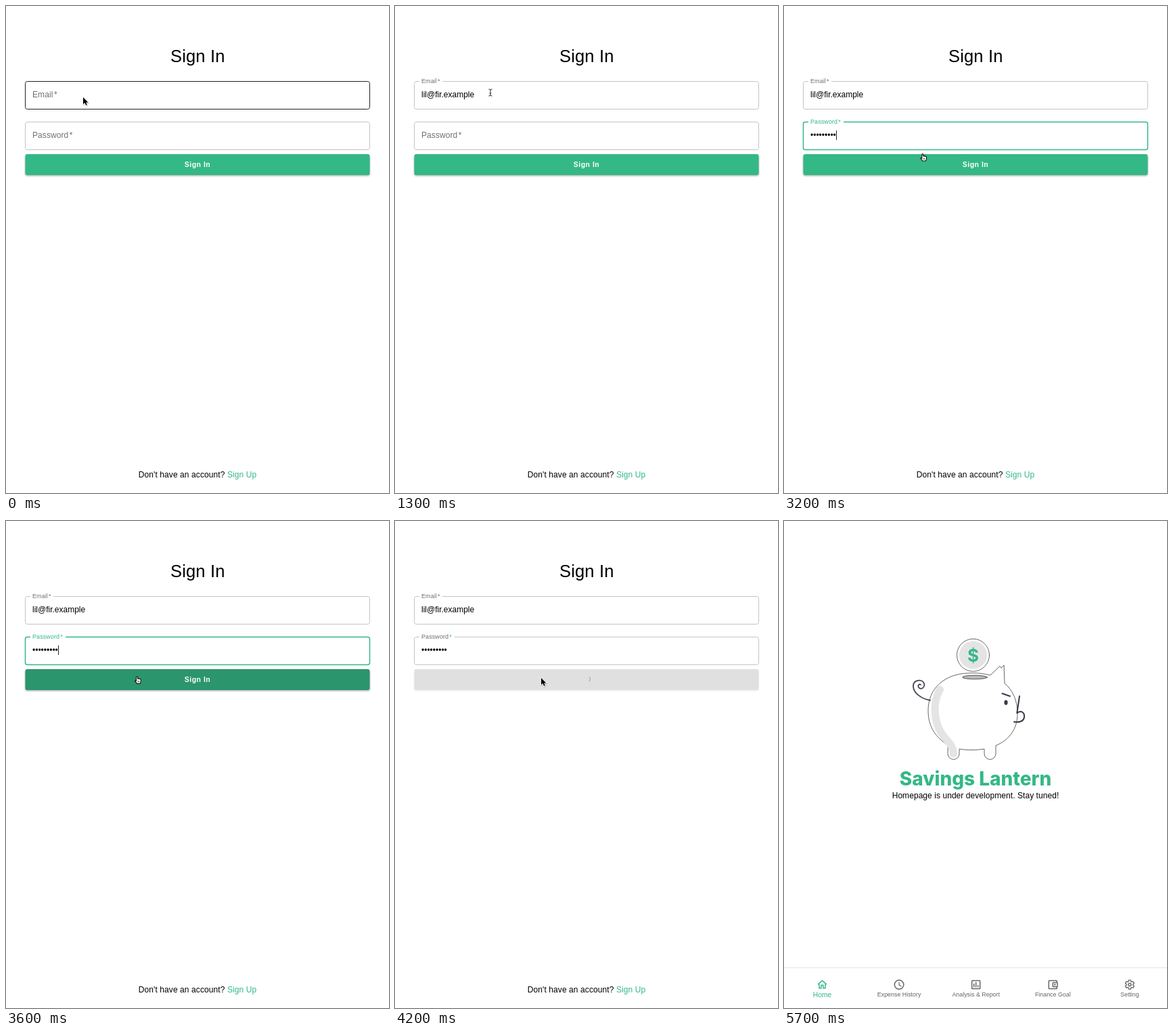
Write an HTML page that moves like this. It is 566 px wide and 720 px high and loops after 7.6 s.

```html
<!DOCTYPE html>
<html lang="en">
<head>
<meta charset="utf-8">
<title>Sign in</title>
<style>
html, body { margin: 0; width: 100%; height: 100%; overflow: hidden; background: #fff; }
svg { display: block; }
text { font-family: "Liberation Sans", Arial, sans-serif; font-size: 12px; white-space: pre; }
.mid { text-anchor: middle; }
.brand { font: 800 28px Inter, sans-serif; }
.coin { font: 700 26px Inter, sans-serif; }
</style>
</head>
<body>
<svg id="stage" width="566" height="720" viewBox="0 0 566 720"></svg>
<script>
const LOOP = 7600, STEP = 100;
const GREEN = [52, 184, 134], GREY = [196, 196, 196], DARK = [34, 34, 34], LABEL = [112, 112, 112];
const rgb = c => `rgb(${c.map(Math.round)})`;
const green = rgb(GREEN);
const between = (t, a, b) => t >= a && t < b;

// Linear interpolation over keys [time, ...values]
function at(t, keys) {
  const i = keys.findIndex(k => k[0] > t);
  if (i === 0) return keys[0].slice(1);
  if (i < 0) return keys[keys.length - 1].slice(1);
  const [a, b] = [keys[i - 1], keys[i]];
  const p = (t - a[0]) / (b[0] - a[0]);
  return a.slice(1).map((v, j) => v + (b[j + 1] - v) * p);
}

const text = (x, y, s, attrs = '') => `<text x="${x}" y="${y}" ${attrs}>${s}</text>`;

function field(y, name, f) {
  const size = 12 - 3 * f.lift, base = y + 24 - 21 * f.lift;
  const notch = (name.length > 5 ? 52 : 34) * f.lift;
  const color = rgb(f.label);
  return `<rect x="28.5" y="${y + .5}" width="509" height="41" rx="3" fill="none"
      stroke="${rgb(f.line)}" stroke-width="${f.width}"/>
    <rect x="36" y="${y - 1}" width="${notch}" height="3" fill="#fff"/>
    <text x="39" y="${base}" fill="${color}" style="font-size:${size}px" letter-spacing=".08"
      >${name}<tspan dx="${size / 8}" fill="${f.star || color}">*</tspan></text>
    ${text(39, y + 24, f.value)}
    ${f.caret ? `<path d="M${f.caret} ${y + 13}v14" stroke="#222"/>` : ''}`;
}

function emailState(t) {
  const [focus] = at(t, [[100, 0], [300, 1], [1000, 1], [1300, 0], [2800, 0], [2801, 1], [2900, 1], [3100, 0]]);
  const mix = (a, b) => a.map((v, i) => v + (b[i] - v) * focus);
  const filled = t >= 700;
  const focused = between(t, 300, 1100) || between(t, 2900, 3000);
  return {
    lift: at(t, [[100, 0], [300, 1]])[0],
    line: mix(t < 200 ? DARK : GREY, GREEN),
    label: mix(LABEL, GREEN),
    width: 1 + .5 * focus,
    value: filled ? 'lil@fir.example' : '',
    caret: focused && (filled ? 118.5 : 39.5)
  };
}

function passwordState(t) {
  const [focus] = at(t, [[2900, 0], [3100, 1], [3600, 1], [3800, 0]]);
  const mix = (a, b) => a.map((v, i) => v + (b[i] - v) * focus);
  return {
    lift: at(t, [[2900, 0], [3100, 1]])[0],
    line: mix(between(t, 2900, 3000) ? DARK : GREY, GREEN),
    label: mix(LABEL, GREEN),
    star: t >= 3000 && green,
    width: 1 + .5 * focus,
    value: t >= 3200 ? '•'.repeat(9) : '',
    caret: between(t, 3000, 3800) && (t >= 3200 ? 77.5 : 39.5)
  };
}

function button(t) {
  const fill = at(t, [[3400, ...GREEN], [3600, 43, 149, 109], [3700, 43, 149, 109],
    [3900, 111, 171, 152], [4200, 224, 224, 224]]);
  const [shade] = at(t, [[3900, .28], [4200, .06]]);
  const [ink] = at(t, [[3600, 1], [3900, 0]]);
  return `<rect x="28" y="220.5" width="510" height="31" rx="3.5" opacity="${shade}" filter="url(#soft)"/>
    <rect x="28.5" y="219" width="509" height="31" rx="3" fill="${rgb(fill)}"/>
    ${text(283, 238, 'Sign In', `class="mid" fill="#fff" opacity="${ink}" letter-spacing=".5" style="font-size:10.5px;font-weight:700"`)}
    ${between(t, 4000, 5200) ? spinner(t - 4000) : ''}`;
}

function spinner(t) {
  const p = t / 1400, len = 14 - 11 * Math.cos(p * 2 * Math.PI);
  return `<circle cx="283" cy="233.7" r="5.2" fill="none" stroke="#a5a5a5" stroke-width="1.1"
    stroke-dasharray="${len} 40" transform="rotate(${p * 360 - 90} 283 233.7)"/>`;
}

const cursors = {
  arrow: `<path d="M0 0v10.2l2.4-2.2 1.7 3.8 1.8-.8-1.7-3.6h3.2z" stroke="#fff" stroke-width="1.4"
    paint-order="stroke" stroke-linejoin="round" filter="url(#drop)"/>`,
  beam: `<path d="M-2.5-5q2.5 0 2.5 1.5q0-1.5 2.5-1.5M0-3.5v7M-2.5 5q2.5 0 2.5-1.5q0 1.5 2.5 1.5M-1.2 1h2.4"
    fill="none" stroke="#222"/>`,
  hand: `<path d="M-2.5 0v-4.3q1-1.4 2 0v2.6q1-.8 1.7.2 1-.7 1.6.3 1.2-.4 1.4.8v2.6l-1 3.2h-4.6l-3-3.8q0-1.6 1.9 0z"
    fill="#fff" stroke="#111" stroke-width="1.1" stroke-linejoin="round"/><path d="M-.2 1v2.4M1.4 1v2.4" stroke="#111" stroke-width=".7"/>`
};

function cursor(t) {
  const [x, y] = at(t, [[0, 114, 135], [100, 130, 131], [500, 184, 132], [600, 184, 132], [700, 141, 128],
    [2800, 141, 128], [2900, 226, 206], [3000, 225, 205], [3300, 197, 233], [3600, 195, 235],
    [3700, 196, 235], [3900, 210, 232], [4200, 216, 232], [5000, 216, 232], [5200, 429, 224], [5300, 540, 219]]);
  const kind = between(t, 100, 3200) ? 'beam' : between(t, 3200, 3800) ? 'hand' : 'arrow';
  return `<g transform="translate(${x} ${y})">${cursors[kind]}</g>`;
}

const login = t => `
  ${text(283.3, 83, 'Sign In', 'class="mid" letter-spacing=".18" style="font-size:25.5px"')}
  ${field(111, 'Email', emailState(t))}
  ${field(171, 'Password', passwordState(t))}
  ${button(t)}
  ${text(283, 697, `Don't have an account? <tspan fill="${green}">Sign Up</tspan>`, 'class="mid" letter-spacing=".09"')}
  ${cursor(t)}`;

const pig = `
  <g fill="none" stroke-linecap="round" stroke-linejoin="round">
    <path d="M242 331C224 320 213 304 213 280C213 247 238 226 272 225C286 224 297 226 305 228L319 214.5L321 217.5L325 213
      L326 240C338 250 345 265 345 285C345 307 333 324 313 332V344A8.5 8.5 0 0 1 296 344V337C283 339 271 339 259 337
      V344A8.5 8.5 0 0 1 242 344Z" fill="#fff" stroke="#555" stroke-width=".9"/>
    <path d="M230.500 249C219 270 220 302 240 323C248 331 250.500 338 250.500 344" stroke="#e4e4e4" stroke-width="11"/>
    <path d="M216 265C204 263 191 255 191 244C191 234.500 204 233 207 240C209 246.500 202 250 199 246C197.500 243 199.500 240.500 202 242"
      stroke="#444450" stroke-width="1.8"/>
    <ellipse cx="282" cy="231" rx="18.500" ry="2.800" fill="#bbb" stroke="#444" stroke-width=".9"/>
    <circle cx="279.500" cy="198.300" r="24" fill="#fff" stroke="#555" stroke-width=".9"/>
    <circle cx="279.500" cy="198.300" r="20.500" fill="#e4e4e4"/>
    <path d="M322.500 255L334 259M348 259L344.300 284C350 279 356 283 355 290C354 297 346 298 340 297"
      stroke="#3a3a4a" stroke-width="2"/>
    <ellipse cx="328" cy="268.300" rx="2.600" ry="3.600" fill="#3a3a4a"/>
  </g>
  ${text(279.5, 208, '$', `class="mid coin" fill="${green}"`)}`;

// Gear outline: six teeth, four corners each
const gear = 'M' + Array.from({ length: 24 }, (_, i) => {
  const corner = i % 4, r = corner === 1 || corner === 2 ? 9 : 6.6;
  const a = (Math.floor(i / 4) * 60 + [-22, -13, 13, 22][corner] - 90) * Math.PI / 180;
  return (12 + r * Math.cos(a)).toFixed(2) + ' ' + (12 + r * Math.sin(a)).toFixed(2);
}).join('L') + 'Z';
const frame = '<rect x="4" y="4" width="16" height="16" rx="1"/>';

const tabs = [
  ['Home', '<path d="M3.500 11.500L12 4l8.500 7.500M6 10.500V19h4v-6h4v6h4v-8.500"/>'],
  ['Expense History', '<circle cx="12" cy="12" r="9"/><path d="M12 7v5.500l4.500 2.700" stroke-width="1.600"/>'],
  ['Analysis &amp; Report', frame + '<path d="M8 10v7M12 7v10M16 13v4"/>'],
  ['Finance Goal', frame + '<rect x="12" y="8" width="9" height="8" rx="1" fill="#fff"/><circle cx="16" cy="12" r=".7"/>'],
  ['Setting', `<path d="${gear}" stroke-width="1.800"/><circle cx="12" cy="12" r="2.700"/>`]
];

function tab([name, icon], i) {
  const x = 56.5 + i * 113.6, color = i ? '#666' : green;
  return `<g transform="translate(${x - 9} 676.5) scale(.75)" fill="none" stroke="${color}" stroke-width="2">${icon}</g>
    ${text(x, i ? 703 : 704, name, `class="mid" fill="${color}" style="font-size:${i ? 8.9 : 10.4}px"`)}`;
}

const home = `${pig}
  ${text(283, 391, 'Savings Lantern', `class="mid brand" fill="${green}"`)}
  ${text(283, 410, 'Homepage is under development. Stay tuned!', 'class="mid" letter-spacing=".06"')}
  <path d="M0 660.500H566" stroke="#e4e4e4"/>
  ${tabs.map(tab).join('')}`;

const defs = `<defs>
  <filter id="soft" x="-5%" y="-50%" width="110%" height="200%"><feGaussianBlur stdDeviation="1.2"/></filter>
  <filter id="drop" x="-50%" y="-50%" width="220%" height="220%">
    <feDropShadow dx=".4" dy=".9" stdDeviation=".7" flood-opacity=".35"/></filter>
</defs>`;

const stage = document.getElementById('stage');
const start = performance.now();
let shown = -1;

function draw() {
  const t = Math.floor((performance.now() - start) % LOOP / STEP) * STEP;
  if (t !== shown) {
    shown = t;
    stage.innerHTML = defs + (t < 5300 ? login(t) : home);
  }
  requestAnimationFrame(draw);
}
draw();
</script>
</body>
</html>
```
